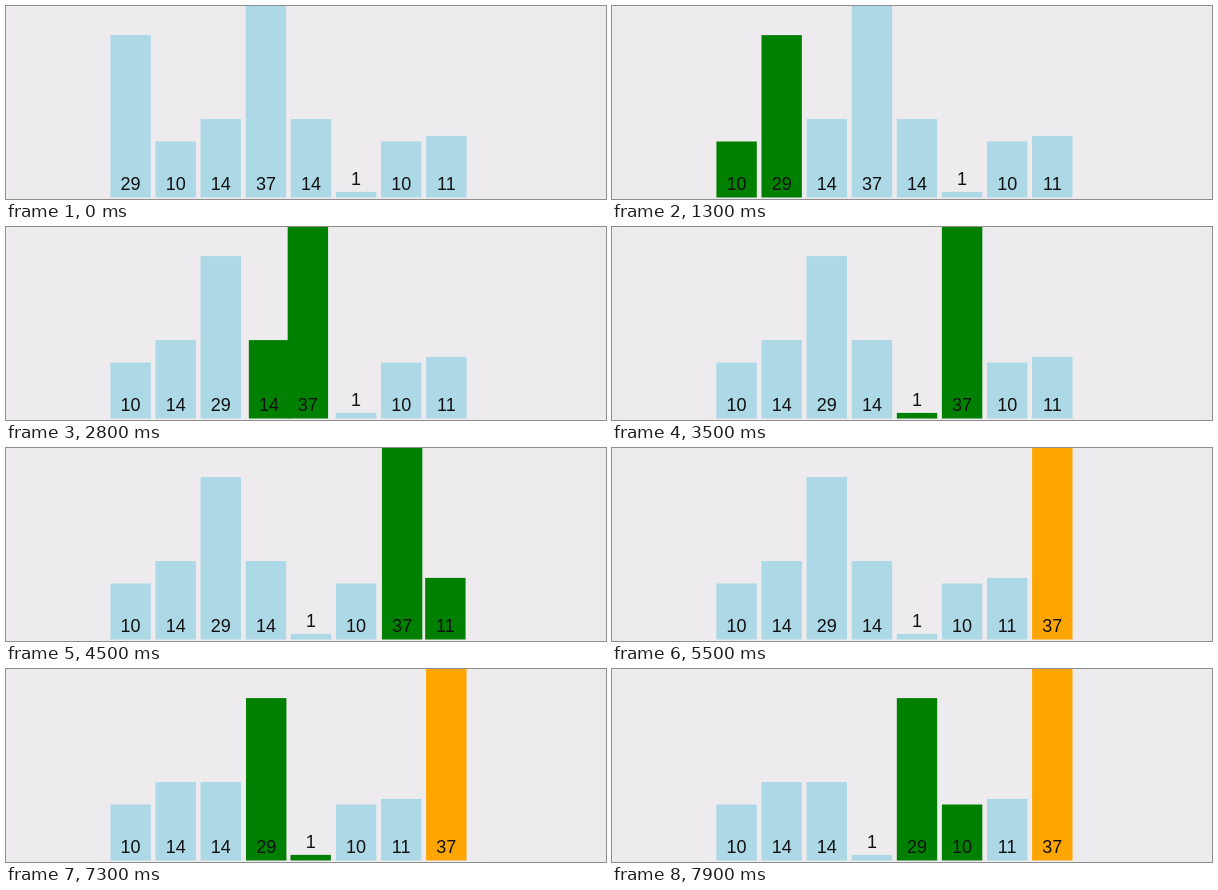
An HTML page with a canvas that plays this animation: 600x193 px, repeating every 8 s.

```html
<!DOCTYPE html>
<html lang="en">
<head>
<meta charset="utf-8">
<title>Bubble sort</title>
<style>
html, body { margin: 0; width: 100%; height: 100%; overflow: hidden; background: #edebed; }
canvas { display: block; }
</style>
</head>
<body>
<canvas id="stage" width="600" height="193"></canvas>
<script>
const ctx = document.getElementById('stage').getContext('2d');
const values = [29, 10, 14, 37, 14, 1, 10, 11];
const BLUE = [173, 216, 230], GREEN = [0, 128, 0], ORANGE = [255, 165, 0];
const LOOP = 8000, TICK = 100, START = 690, STEP = 313;
const LEFT = 104.4, PITCH = 45.1, WIDTH = 40.4, BASE = 191.5, UNIT = 5.6;

// Each state holds the slot and the colour of every bar.
function sortStates() {
  const order = values.map((_, i) => i), states = [];
  let sorted = values.length;
  const push = (...active) => states.push(values.map((_, bar) => {
    const slot = order.indexOf(bar);
    return { slot, color: slot >= sorted ? ORANGE : active.includes(slot) ? GREEN : BLUE };
  }));
  push();
  for (let pass = 0; pass < 2; pass++) {
    for (let i = 0; i + 1 < sorted; i++) {
      push(i, i + 1);
      if (values[order[i]] > values[order[i + 1]]) {
        [order[i], order[i + 1]] = [order[i + 1], order[i]];
        push(i, i + 1);
      }
    }
    sorted--;
    // Mark the last bar, then rest before the next pass.
    for (let k = 0; k < 3; k++) push();
  }
  return states;
}

const states = sortStates();
const ease = p => p < 0.5 ? 4 * p ** 3 : 1 - 4 * (1 - p) ** 3;
const mix = (a, b, p) => a + (b - a) * p;

function draw(t) {
  const progress = Math.max(0, (t - START) / STEP);
  const n = Math.floor(progress), p = ease(progress - n);
  ctx.fillStyle = '#edebed';
  ctx.fillRect(0, 0, 600, 193);
  ctx.font = '18px "Liberation Sans", Arial, sans-serif';
  ctx.textAlign = 'center';
  values.forEach((value, i) => {
    const from = states[n][i], to = states[n + 1][i];
    const x = LEFT + PITCH * mix(from.slot, to.slot, p);
    const height = value * UNIT;
    ctx.fillStyle = `rgb(${from.color.map((c, k) => Math.round(mix(c, to.color[k], p)))})`;
    ctx.fillRect(x, BASE - height, WIDTH, height);
    ctx.fillStyle = '#111';
    ctx.fillText(value, x + WIDTH / 2, height < 20 ? 178.7 : 184.4);
  });
}

const origin = performance.now();
function frame() {
  const t = (performance.now() - origin) % LOOP;
  draw(Math.floor(t / TICK) * TICK);
  requestAnimationFrame(frame);
}
frame();
</script>
</body>
</html>
```
